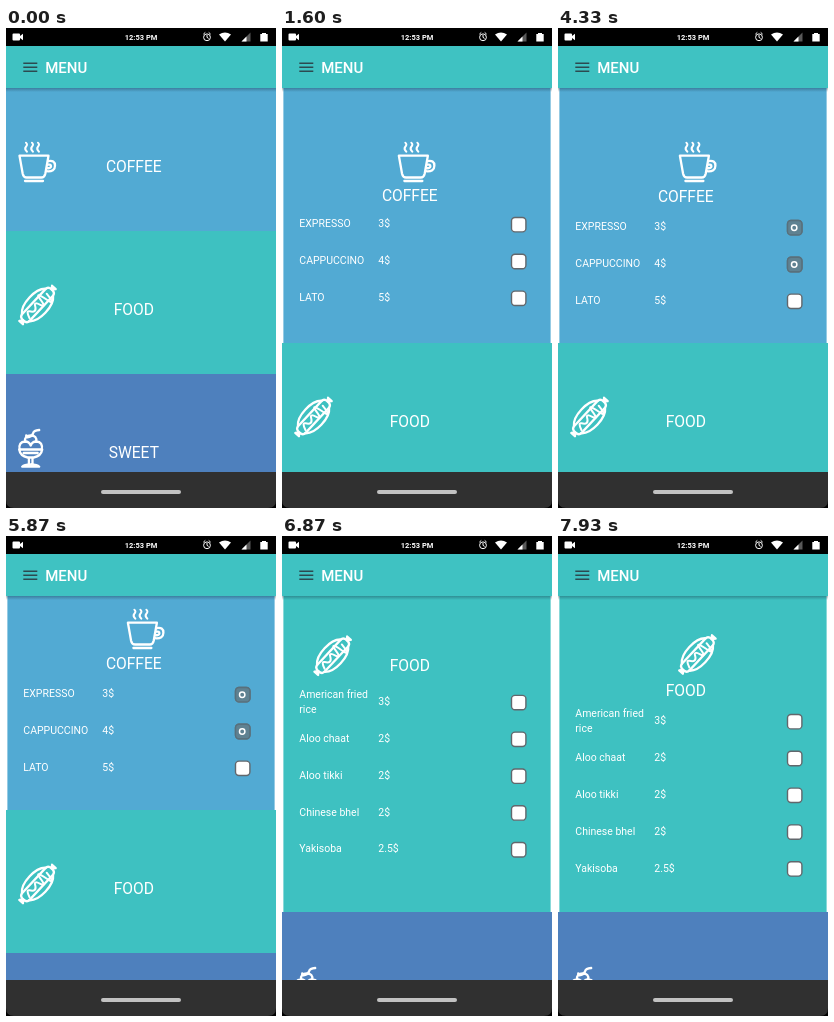
An HTML page for the animation above (8000 ms loop, 270 by 480 pixels).

```html
<!DOCTYPE html>
<html lang="en">
<head>
<meta charset="utf-8">
<title>Menu</title>
<style>
html, body { margin: 0; height: 100%; overflow: hidden; background: #fff; }
svg { display: block; width: 100%; height: 100%; }
text { font-family: Roboto, "Open Sans", sans-serif; fill: #fff; }
.title { font-size: 15.6px; text-anchor: middle; }
.row { font-size: 10.5px; }
.icon { fill: none; stroke: #fff; stroke-width: 2.3; stroke-linecap: round; stroke-linejoin: round; }
.solid { fill: #fff; }
</style>
</head>
<body>
<svg viewBox="0 0 270 480">
  <defs>
    <linearGradient id="shade" x2="0" y2="1">
      <stop stop-color="#123" stop-opacity=".32"/>
      <stop offset="1" stop-color="#123" stop-opacity="0"/>
    </linearGradient>
  </defs>
  <g id="list"></g>

  <rect y="60" width="270" height="4" fill="url(#shade)"/>
  <rect width="270" height="60" fill="#3fc2c2"/>
  <path d="M17.300 35.200h14M17.300 39.200h14M17.300 43.200h14" stroke="#2c4a50" stroke-width="1.500"/>
  <text x="39.200" y="44.500" font-size="15" font-weight="500">MENU</text>

  <rect width="270" height="18" fill="#000"/>
  <text x="135" y="12" font-size="7.5" font-weight="700" text-anchor="middle">12:53 PM</text>
  <g class="solid">
    <path d="M7.500 5.500h5.500a1 1 0 0 1 1 1v1.600l3-2.400v6.600l-3-2.400v1.600a1 1 0 0 1-1 1h-5.500a1 1 0 0 1-1-1v-5a1 1 0 0 1 1-1z"/>
    <path d="M213 6.600q6-4 12 0l-6 7z"/>
    <path d="M256 5h4v1h1.700v7.500h-7.400v-7.500h1.700z"/>
    <path d="M235.500 13.500l9-9v9z" opacity=".35"/>
    <path d="M235.500 13.500l5-5v5z"/>
  </g>
  <path d="M201 7v2.400l1.600 1M197.300 6.200l2-1.800M204.700 6.200l-2-1.800M197.600 9.300a3.400 3.400 0 1 0 6.800 0a3.400 3.400 0 1 0-6.800 0"
        fill="none" stroke="#fff"/>

  <rect y="444" width="270" height="36" fill="#303030"/>
  <rect x="95" y="462" width="80" height="4" rx="2" fill="#c2c2c2"/>
  <path d="M0 472q0 8 8 8h-8zM270 472q0 8-8 8h8z"/>
</svg>
<script>
const LOOP = 8000, TOP = 60, CLOSED = 143, SCROLL = 157;

// Icons are drawn around their own centre.
const cup = `
  <path d="M-10-10q-3-2.500-1-5t0-4M-4-10q-3-2.500-1-5t0-4M2-10q-3-2.500-1-5t0-4" stroke-width="2"/>
  <path d="M-17.500-6h29l-3.200 18q-.800 3.800-4 3.800h-14.600q-3.200 0-4-3.800zM-12 19.300h18"/>
  <path d="M11-.500q7-1.500 7 4.500q0 6.300-8.500 5.500M11 3q3-.500 3 1.500q0 2.300-3.700 2" />`;
const hotdog = `
  <g transform="rotate(-47)">
    <path d="M-17.500-5q5-6 17.500-6t17.500 6M-17.500 5q5 6 17.500 6t17.500-6"/>
    <path d="M-17-5h34q4 0 4 5t-4 5h-34q-4 0-4-5t4-5z"/>
    <path d="M-15 3q3-8 5-4.500t4 3.500t4-3.500t4 3.500t4-3.500t4 3.500t4.500-3" stroke-width="2"/>
    <path d="M-21 0l-3-2.500v5zM21 0l3-2.500v5z" class="solid"/>
  </g>`;
const sundae = `
  <path d="M-6 -13q0 2.500 3 1.500q3.500-1.500 4-4t6-3" transform="translate(1.500 .500)"/>
  <path d="M-5.500-6.500q-1-6 5.500-6t5.500 6"/>
  <path d="M-11 1.500q-1.500-7.500 5.500-8q4 0 5.500 4q1.500-4 5.500-4q7 .500 5.500 8"/>
  <path d="M-11.500 1.500h23q-1 6.500-8.500 8h-6q-7.500-1.500-8.500-8zM-7 5h14"/>
  <path d="M-1.800 10v6M1.800 10v6M-8.500 18.700q2-2.200 8.500-2.200t8.500 2.200z"/>`;

// open / close: when the layout switches; start: when the easing began
const panels = [
  { name: "COFFEE", color: "#52aad3", icon: cup, iconX: 31, iconY: [73.7, 73.7], height: 255, start: 870, open: 905, close: 6835,
    rows: [["EXPRESSO", "3$", 2700], ["CAPPUCCINO", "4$", 3240], ["LATO", "5$"]] },
  { name: "FOOD", color: "#3ec1c1", icon: hotdog, iconX: 31.5, iconY: [74, 72.5], height: 330, start: 6725, open: 6835, close: LOOP,
    rows: [["American fried|rice", "3$"], ["Aloo chaat", "2$"], ["Aloo tikki", "2$"], ["Chinese bhel", "2$"], ["Yakisoba", "2.5$"]] },
  { name: "SWEET", color: "#4e80bd", icon: sundae, iconX: 24.7, iconY: [74, 74], height: CLOSED, start: LOOP, open: LOOP, close: LOOP, rows: [] }
];

const box = (fill, stroke) =>
  `<rect x="229.500" y="-6.200" width="14.400" height="14.400" rx="3.500" fill="${fill}" stroke="${stroke}" stroke-width="1.400"/>`;

function rowMarkup([name, price, tick], i) {
  const lines = name.split("|");
  const label = lines.map((s, k) =>
    `<text x="17.300" y="${3.7 + 15.5 * (k - (lines.length - 1) / 2)}">${s}</text>`).join("");
  const check = tick ? `<g class="tick">${box("#5f8292", "#58707c")}
    <circle cx="236.200" cy="1" r="2.700" fill="none" stroke="#fff" stroke-width="1.500"/></g>` : "";
  return `<g transform="translate(0 ${138.7 + 36.8 * i})">${label}
    <text x="96.300" y="3.700">${price}</text>${box("#fff", "#62676c")}${check}</g>`;
}

const list = document.getElementById("list");
list.innerHTML = panels.map(p => `<g>
  <rect fill="${p.color}"/>
  <g class="icon">${p.icon}</g>
  <text class="title" x="127.800">${p.name}</text>
  <g class="row">${p.rows.map(rowMarkup).join("")}</g></g>`).join("");

panels.forEach((p, i) => {
  p.el = list.children[i];
  [p.rect, p.iconEl, p.title, p.rowsEl] = p.el.children;
  p.ticks = [...p.el.querySelectorAll(".tick")];
});

const clamp = x => Math.min(1, Math.max(0, x));

function bezier(x1, y1, x2, y2) {
  const at = (a, b, s) => 3 * (1 - s) ** 2 * s * a + 3 * (1 - s) * s * s * b + s ** 3;
  return x => {
    let lo = 0, hi = 1;
    for (let i = 0; i < 20; i++) {
      const mid = (lo + hi) / 2;
      if (at(x1, x2, mid) < x) lo = mid; else hi = mid;
    }
    return at(y1, y2, hi);
  };
}
const ease = bezier(.25, .1, .25, 1);
const easeInOut = bezier(.42, 0, .58, 1);
const mix = (a, b, k) => a + (b - a) * k;
const move = (el, x, y) => el.setAttribute("transform", `translate(${x} ${y})`);

function scrollAt(t) {
  if (t < 5824) return 0;
  return t > 6525 ? SCROLL : Math.round(SCROLL * (1 - Math.exp((5824 - t) / 155)));
}

function draw(t) {
  let y = TOP - scrollAt(t);
  for (const p of panels) {
    const open = t >= p.open && t < p.close;
    const time = open ? clamp((t - p.start) / 1000) : 0;
    const k = open ? ease(time) : 0;
    const height = open ? p.height : CLOSED;
    move(p.el, 0, y);
    p.rect.setAttribute("x", open ? 1.4 : 0);
    p.rect.setAttribute("width", open ? 267.2 : 270);
    p.rect.setAttribute("height", height);
    move(p.iconEl, mix(p.iconX, 139.4, k), mix(...p.iconY, k));
    p.title.setAttribute("y", mix(83.7, 114, k));
    p.rowsEl.style.display = open ? "" : "none";
    move(p.rowsEl, 0, open ? -20 * (1 - easeInOut(time)) : 0);
    p.ticks.forEach((el, i) => el.setAttribute("opacity", ease(clamp((t - p.rows[i][2]) / 400))));
    y += height;
  }
}

function frame() {
  draw(performance.now() % LOOP);
  requestAnimationFrame(frame);
}
frame();
</script>
</body>
</html>
```
